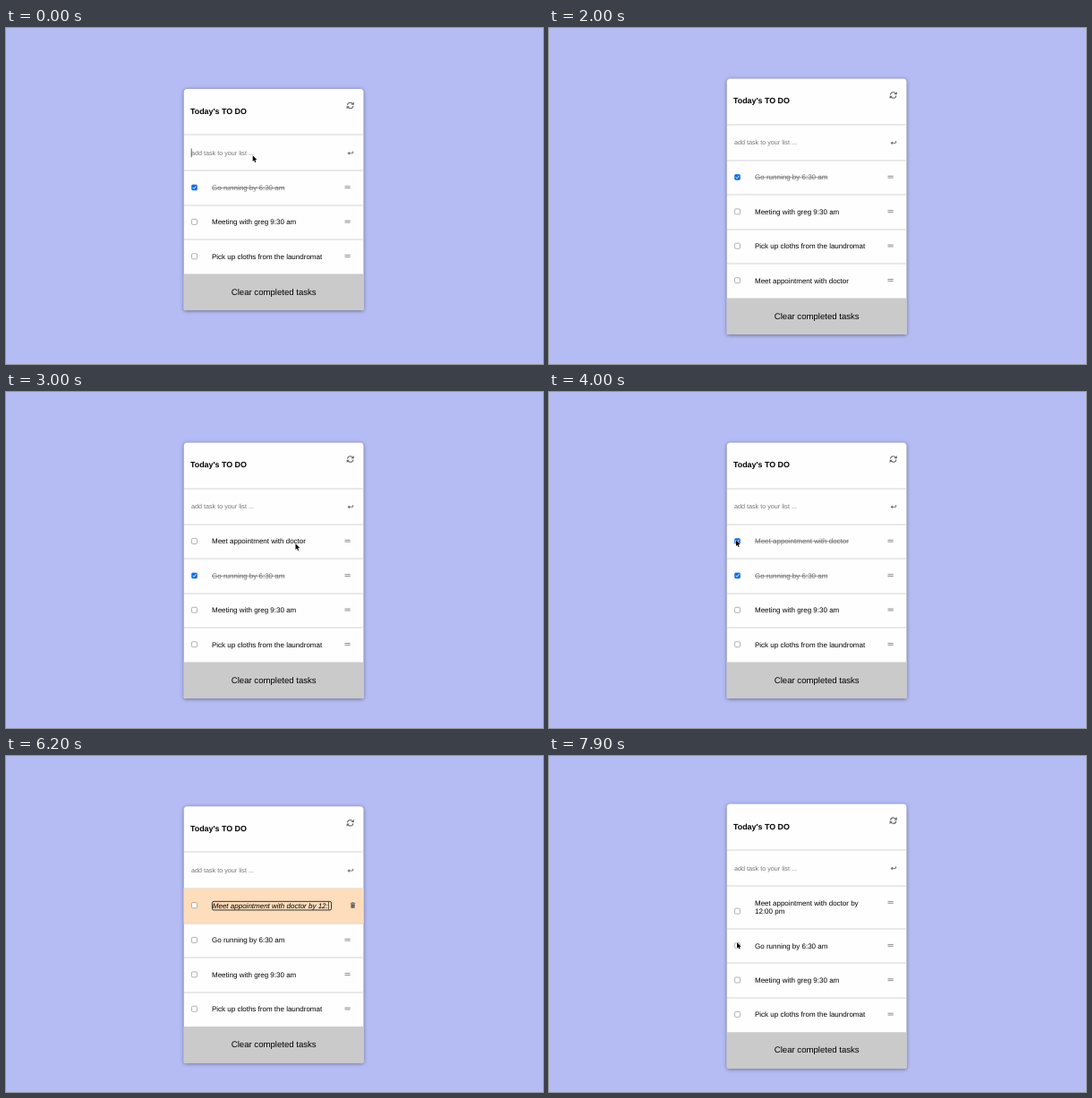
These frames come from a looping animation (600 by 375 pixels, 8000 ms). An HTML page with a canvas:

```html
<!DOCTYPE html>
<html lang="en">
<head>
<meta charset="utf-8">
<title>To do list</title>
<style>
  html, body { margin: 0; width: 100%; height: 100%; overflow: hidden; background: #b5bcf4; }
  canvas { display: block; width: 600px; height: 375px; }
</style>
</head>
<body>
<canvas id="stage"></canvas>
<script>
const LOOP = 8000, STEP = 100;
const LEFT = 198.7, WIDTH = 200.8, ROW = 38.4, LINE = 9.5;
const FONT = '"Liberation Sans", Arial, sans-serif';
const canvas = document.getElementById('stage');
const ctx = canvas.getContext('2d');
const ratio = window.devicePixelRatio || 1;
canvas.width = 600 * ratio;
canvas.height = 375 * ratio;

const RUN = 'Go running by 6:30 am';
const MEETING = 'Meeting with greg 9:30 am';
const LAUNDRY = 'Pick up cloths from the laundromat';
const DOCTOR = 'Meet appointment with doctor';
const ADDED = ' by 12:00 pm';

const ADD_AT = 1900, DRAG_FROM = 2400, DROP_AT = 2850;
const EDIT_FROM = 4900, EDIT_TO = 7400;

// Pointer journeys: [time, x, y]; the pointer is hidden between them
const journeys = [
  [[0, 275.7, 142.3], [100, 274, 151], [200, 271, 169]],
  [[2100, 316, 268], [2300, 325.5, 281], [2400, 325.5, 281], [2800, 323.5, 169.3],
   [3100, 323.5, 169.3], [3700, 209, 165.3], [4100, 209, 165.3], [4300, 209, 204.5],
   [4500, 209, 204.5], [4900, 300, 165]],
  [[7100, 391, 175], [7200, 393, 184], [7400, 393, 184], [7800, 210, 208], [8000, 210, 208]]
];

const ease = p => p * p * (3 - 2 * p);
const ramp = (t, t0, t1, a, b) => a + (b - a) * Math.min(1, Math.max(0, (t - t0) / (t1 - t0)));

function pointerAt(t) {
  for (const path of journeys) {
    if (t < path[0][0] || t > path[path.length - 1][0]) continue;
    for (let i = 1; i < path.length; i++) {
      const [t0, x0, y0] = path[i - 1], [t1, x1, y1] = path[i];
      if (t > t1) continue;
      const p = ease((t - t0) / (t1 - t0));
      return { x: x0 + (x1 - x0) * p, y: y0 + (y1 - y0) * p };
    }
  }
  return null;
}

function text(str, x, y, size, color = '#000', style = '') {
  ctx.font = `${style} ${size}px ${FONT}`;
  ctx.fillStyle = color;
  ctx.fillText(str, x, y);
  return ctx.measureText(str).width;
}

function rect(x, y, w, h, color) {
  ctx.fillStyle = color;
  ctx.fillRect(x, y, w, h);
}

function rounded(x, y, w, h, r) {
  ctx.beginPath();
  ctx.roundRect(x, y, w, h, r);
}

function line(points, color, width) {
  ctx.beginPath();
  points.forEach(([x, y]) => ctx.lineTo(x, y));
  ctx.strokeStyle = color;
  ctx.lineWidth = width;
  ctx.stroke();
}

function polygon(points, color) {
  ctx.beginPath();
  points.forEach(([x, y]) => ctx.lineTo(x, y));
  ctx.closePath();
  ctx.fillStyle = color;
  ctx.fill();
}

const divider = y => rect(LEFT, Math.round(y) - 0.5, WIDTH, 1, '#d6d6d6');

function refreshIcon(x, y) {
  ctx.save();
  ctx.translate(x, y);
  for (let i = 0; i < 2; i++) {
    ctx.beginPath();
    ctx.arc(0, 0, 3.2, Math.PI * 1.05, Math.PI * 1.8);
    ctx.strokeStyle = '#666';
    ctx.lineWidth = 1.1;
    ctx.stroke();
    polygon([[4.1, -4], [4.1, -0.7], [0.8, -0.7]], '#666');
    ctx.rotate(Math.PI);
  }
  ctx.restore();
}

function enterIcon(x, y) {
  line([[x + 2.8, y - 1.9], [x + 2.8, y + 0.3], [x - 2, y + 0.3]], '#666', 0.9);
  polygon([[x - 3.2, y + 0.3], [x - 1, y - 1.6], [x - 1, y + 2.2]], '#666');
}

function trashIcon(x, y) {
  rect(x - 2.7, y - 2.7, 5.4, 0.9, '#666');
  rect(x - 1, y - 3.3, 2, 0.8, '#666');
  polygon([[x - 2.3, y - 1.4], [x + 2.3, y - 1.4], [x + 2, y + 3.2], [x - 2, y + 3.2]], '#666');
}

function checkbox(x, y, on) {
  rounded(x - 3, y - 3, 6, 6, 1.2);
  ctx.fillStyle = on ? '#0d6fe8' : '#fff';
  ctx.fill();
  ctx.strokeStyle = on ? '#0d6fe8' : '#808080';
  ctx.lineWidth = 0.6;
  ctx.stroke();
  if (on) line([[x - 1.8, y], [x - 0.5, y + 1.4], [x + 1.9, y - 1.6]], '#fff', 0.9);
}

function drawPointer({ x, y }) {
  const shape = [[0, 0], [0, 6.6], [1.5, 5.3], [2.5, 7.6], [3.6, 7.1], [2.6, 4.9], [4.6, 4.8]]
    .map(([dx, dy]) => [x + dx, y + dy]);
  line([...shape, shape[0]], '#fff', 1);
  polygon(shape, '#000');
}

function drawRow(item, y) {
  const base = y + 21.5 + (item.edit ? 0.4 : 0);
  const last = base + (item.lines.length - 1) * LINE;
  if (item.edit) rect(LEFT, y, WIDTH, item.h, '#fdddbb');
  checkbox(210.5, last - 2.9, item.done);

  let end = 0;
  item.lines.forEach((str, i) => {
    const b = base + i * LINE;
    end = text(str, item.edit ? 230.8 : 230, b, 8, item.done ? '#6e6e6e' : '#000', item.edit ? 'italic' : '');
    if (item.done) rect(230, b - 2.9, end, 0.7, '#6e6e6e');
  });

  if (item.edit) {
    const w = item.lines.length > 1 ? 136 : end + 4.2;
    rounded(230.4, base - 7.2, w, 9.6 + (item.lines.length - 1) * LINE, 1.6);
    ctx.strokeStyle = '#222';
    ctx.lineWidth = 0.9;
    ctx.stroke();
    rect(231.2 + end, last - 6.8, 0.6, 8.6, '#000');
    trashIcon(387.5, y + 18.9);
  } else {
    rect(378.5, y + 16.9, 6.2, 0.9, '#858585');
    rect(378.5, y + 18.8, 6.2, 0.9, '#858585');
  }
}

function itemsAt(t) {
  const item = (str, done = false) => ({ lines: [str], done, h: ROW });
  const run = item(RUN, t < 4400);
  const doctor = item(DOCTOR, t >= 3800 && t < 4100);
  const rest = [item(MEETING), item(LAUNDRY)];
  if (t < ADD_AT) return [run, ...rest];
  if (t < DROP_AT) return [run, ...rest, doctor];

  const count = t < 5500 ? 0 : t < 6300
    ? Math.floor(ramp(t, 5500, 6200, 1, 7) + 1e-6)
    : Math.min(12, 8 + (t - 6300) / STEP);
  const typed = ADDED.slice(0, count);
  doctor.edit = t >= EDIT_FROM && t < EDIT_TO;
  doctor.lines = count > 7 ? [DOCTOR + typed.slice(0, 3), typed.slice(4)] : [DOCTOR + typed];
  doctor.h = ROW + (doctor.edit ? 0.8 : 0) + (count > 7 ? 9.6 : 0);
  return [doctor, run, ...rest];
}

function typedCount(t) {
  if (t < 300 || t >= ADD_AT) return 0;
  return Math.floor(t <= 900 ? ramp(t, 300, 900, 1, 10) : ramp(t, 900, 1800, 10, 28));
}

function draw(t) {
  ctx.setTransform(ratio, 0, 0, ratio, 0, 0);
  ctx.textRendering = 'geometricPrecision';
  rect(0, 0, 600, 375, '#b5bcf4');

  const items = itemsAt(t);
  const listHeight = items.reduce((sum, item) => sum + item.h, 0);
  const top = 68 - 0.3 * (listHeight - 3 * ROW);
  const listTop = top + 91.4;
  const listEnd = listTop + listHeight;
  const height = 131.8 + listHeight;

  ctx.save();
  ctx.shadowColor = 'rgba(0,0,0,.45)';
  ctx.shadowBlur = 4 * ratio;
  ctx.shadowOffsetY = 0.8 * ratio;
  rounded(LEFT, top, WIDTH, height, [4, 4, 1.5, 1.5]);
  ctx.fillStyle = '#fefefe';
  ctx.fill();
  ctx.restore();

  text("Today's TO DO", 206, top + 28, 8.9, '#000', 'bold');
  refreshIcon(384.7, top + 18.5);
  divider(top + 51.2);

  const count = typedCount(t);
  const typed = count
    ? text(DOCTOR.slice(0, count), 207, top + 74.4, 9)
    : (text('add task to your list ...', 207, top + 74, 7.2, '#757575'), 0);
  if (t < ADD_AT) rect(206.8 + typed, top + 66.5, 0.7, 9.8, '#222');
  enterIcon(384.8, top + 71.5);
  divider(listTop);

  let y = listTop;
  items.forEach((item, i) => {
    drawRow(item, y);
    y += item.h;
    if (i < items.length - 1) divider(y);
  });

  rounded(LEFT, listEnd, WIDTH, 40.4, [0, 0, 1.5, 1.5]);
  ctx.fillStyle = '#cacaca';
  ctx.fill();
  ctx.textAlign = 'center';
  text('Clear completed tasks', 299.2, listEnd + 23.2, 9.6);
  ctx.textAlign = 'left';

  const pointer = pointerAt(t);
  if (t >= DRAG_FROM && t < DROP_AT) {
    const from = listEnd - ROW;
    ctx.save();
    ctx.globalAlpha = 0.7;
    ctx.translate(pointer.x - 325.5, pointer.y - 281);
    rect(LEFT, from, WIDTH, ROW, '#fefefe');
    drawRow(items[3], from);
    ctx.restore();
  }
  if (pointer) drawPointer(pointer);
}

const start = performance.now();
function tick(now) {
  const t = Math.max(0, now - start) % LOOP;
  draw(Math.floor(t / STEP) * STEP);
  requestAnimationFrame(tick);
}
draw(0);
requestAnimationFrame(tick);
</script>
</body>
</html>
```
